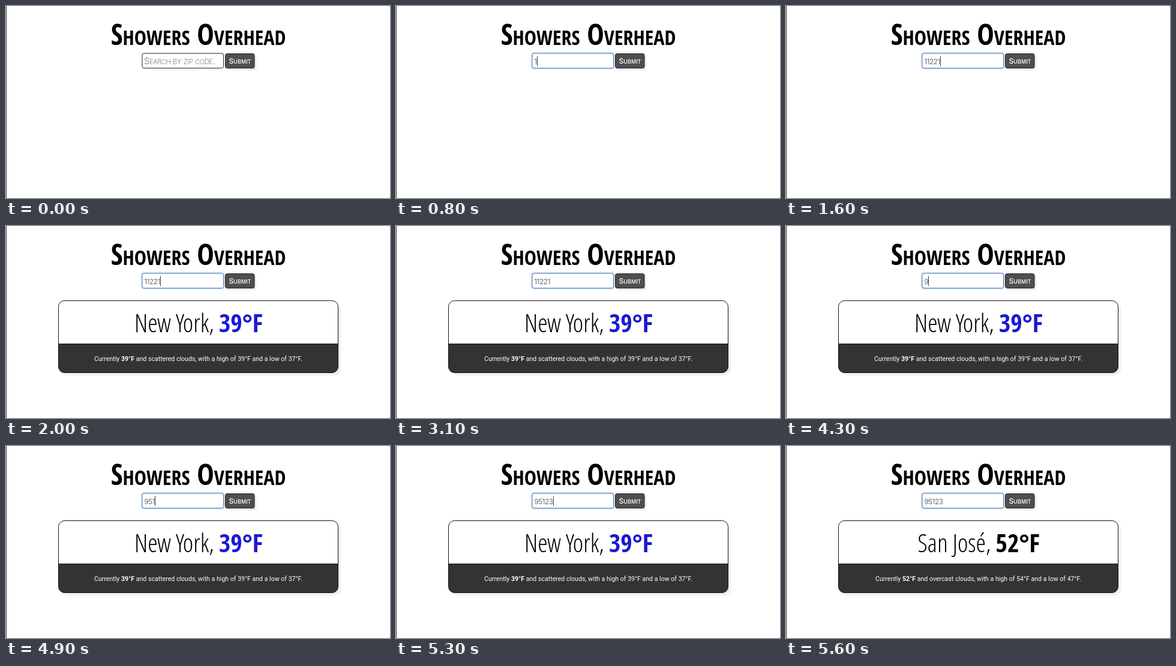
Write an HTML page that moves like this. It is 640 by 320 pixels and loops after 6000 ms.

```html
<!DOCTYPE html>
<html lang="en">
<head>
<meta charset="utf-8">
<title>Showers Overhead</title>
<style>
  html, body { margin: 0; width: 100%; height: 100%; overflow: hidden; background: #fff; }
  svg { display: block; width: 100vw; height: 100vh; }
  .center { text-anchor: middle; }
  .caps { font-variant: small-caps; }
  .bold { font-family: "Open Sans Condensed", "Open Sans", sans-serif; font-stretch: 75%; font-weight: 700; }
  .light { font-family: "Open Sans Condensed Light", "Open Sans", sans-serif; font-stretch: 75%; font-weight: 300; }
  .title { font-size: 48px; }
  .city { font-size: 42px; }
  .form { font-family: Inter, sans-serif; font-weight: 300; fill: #444; }
  .placeholder { font-size: 15px; font-weight: 200; letter-spacing: -.3px; }
  .zip { font-size: 12px; letter-spacing: -.5px; }
  .button { font-size: 12.2px; font-weight: 500; fill: #fff; }
  .summary { font: 400 10.6px Roboto, sans-serif; fill: #fff; }
  .summary .temp { font-weight: 700; }
</style>
</head>
<body>
<svg viewBox="0 0 640 320">
  <defs>
    <filter id="soft" x="-10%" y="-20%" width="120%" height="140%"><feGaussianBlur stdDeviation="1"/></filter>
    <clipPath id="cardShape"><rect x="87.5" y="124.5" width="466" height="120" rx="10"/></clipPath>
  </defs>
  <rect width="640" height="320" fill="#fff"/>
  <rect width="1" height="320" fill="#444"/>
  <path d="M639 0h1v1zM640 319v1h-1z" fill="#444"/>

  <text class="title bold caps center" x="320.5" y="65">Showers Overhead</text>

  <rect id="glow" x="226.500" y="78.500" width="136.500" height="25.500" rx="3.500" fill="none" stroke="#a9c6ee" stroke-width="2" filter="url(#soft)"/>
  <rect id="field" x="227" y="79" width="135.500" height="24.500" rx="3" fill="#fff"/>
  <rect id="selection" x="230.500" y="82" height="18" fill="#b3d7ff"/>
  <text id="placeholder" class="form placeholder caps" x="230" y="97">Search by zip code.</text>
  <text id="zip" class="form zip" x="230.500" y="96.800"></text>
  <rect id="caret" y="83" width="1" height="17" fill="#444"/>

  <rect x="368" y="82" width="49" height="25" rx="3" fill="#e8e8e8" filter="url(#soft)"/>
  <rect x="365.500" y="79.500" width="48.500" height="24" rx="3" fill="#4f4f4f" stroke="#222"/>
  <text class="form button caps center" x="390" y="95.500">Submit</text>

  <g id="card">
    <rect x="92" y="129" width="466" height="120" rx="10" fill="#eee" filter="url(#soft)"/>
    <g clip-path="url(#cardShape)">
      <rect x="87" y="124" width="467" height="121" fill="#fff"/>
      <rect x="87" y="196" width="467" height="50" fill="#333"/>
    </g>
    <path d="M87.500 196.500h466" stroke="#111"/>
    <rect x="87.500" y="124.500" width="466" height="120" rx="10" fill="none" stroke="#111"/>
    <text class="city center" x="321" y="177"><tspan class="light" id="city"></tspan><tspan class="bold" id="temp"></tspan></text>
    <text class="summary center" x="320.500" y="224.700">Currently <tspan class="temp" id="now"></tspan><tspan id="outlook"></tspan></text>
  </g>
</svg>
<script>
  const LOOP = 6000;
  const get = id => document.getElementById(id);
  const show = (id, on) => get(id).setAttribute("visibility", on ? "visible" : "hidden");
  const set = (id, attributes) => {
    for (const name in attributes) get(id).setAttribute(name, attributes[name]);
  };
  const within = (t, from, to) => t >= from && t < to;

  const FOCUS = 100, SECOND_ENTRY = 4300;
  const FIRST_RESULT = 2000, SECOND_RESULT = 5500;
  const entries = [
    { zip: "11221", keys: [800, 1000, 1200, 1400, 1600] },
    { zip: "95123", keys: [4300, 4700, 4900, 5100, 5300] }
  ];
  const reports = [
    { city: "New York, ", temp: "39°F", sky: "scattered clouds", high: 39, low: 37, color: "#1919d4" },
    { city: "San José, ", temp: "52°F", sky: "overcast clouds", high: 54, low: 47, color: "#000" }
  ];

  function drawField(t) {
    const focused = t >= FOCUS;
    const selected = within(t, 3400, SECOND_ENTRY);
    const entry = entries[t < SECOND_ENTRY ? 0 : 1];
    const typed = entry.keys.filter(key => t >= key).length;
    get("zip").textContent = entry.zip.slice(0, typed);
    const width = typed ? get("zip").getComputedTextLength() : 0;

    show("placeholder", !focused);
    show("glow", focused);
    set("field", { stroke: focused ? "#4a78b5" : "#222" });
    show("selection", selected);
    set("selection", { width });
    const blinkedOff = within(t, 2100, 2500) || within(t, 3000, 3400) || t >= 5600;
    show("caret", focused && !selected && !blinkedOff);
    set("caret", { x: Math.round(230.5 + width) });
  }

  function drawCard(t) {
    const { city, temp, sky, high, low, color } = reports[t < SECOND_RESULT ? 0 : 1];
    show("card", t >= FIRST_RESULT);
    get("city").textContent = city;
    get("temp").textContent = get("now").textContent = temp;
    set("temp", { fill: color });
    get("outlook").textContent = ` and ${sky}, with a high of ${high}°F and a low of ${low}°F.`;
  }

  const start = performance.now();
  function draw() {
    const t = (performance.now() - start) % LOOP;
    drawField(t);
    drawCard(t);
    requestAnimationFrame(draw);
  }
  draw();
</script>
</body>
</html>
```
